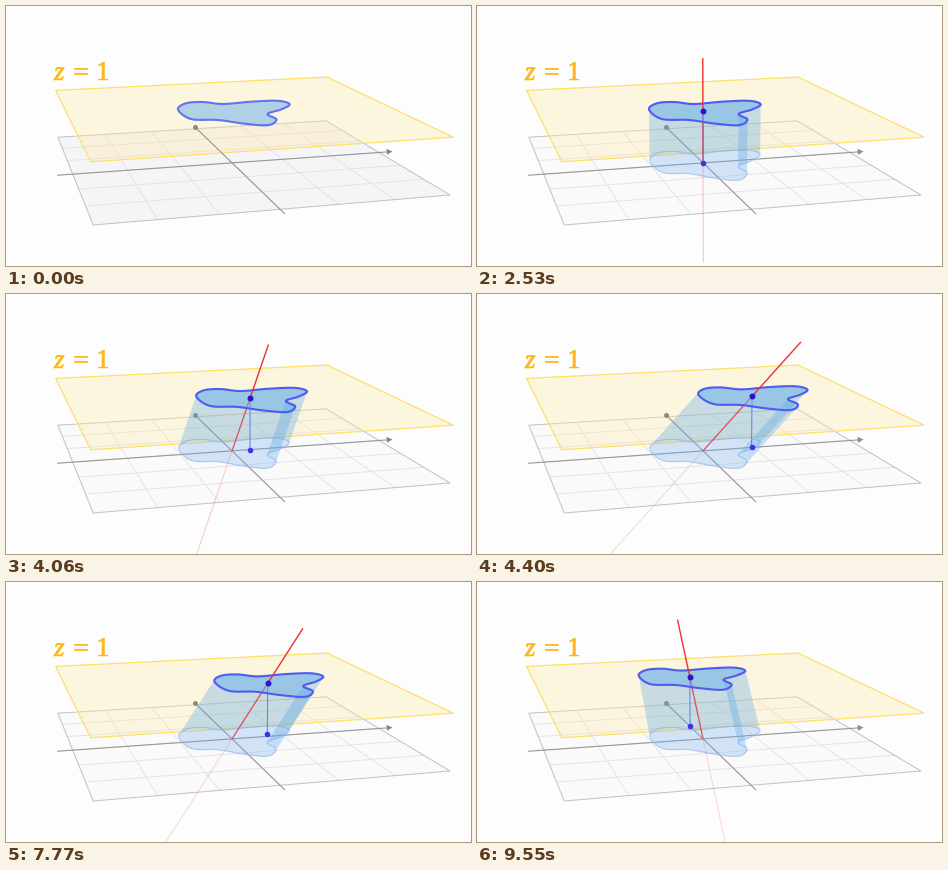
A matplotlib script that plays this animation: 465 px wide and 260 px high, repeating every 9.91 s.

```python
import numpy as np
import matplotlib.pyplot as plt
from matplotlib.animation import FuncAnimation
from matplotlib.collections import PolyCollection
from matplotlib.patheffects import withStroke

W, H, DPI = 465, 260, 100
LOOP, FRAMES = 9910, 200
STEP = LOOP / FRAMES
PX = 72 / DPI
AMBER = "#fbb81c"

# plane corners in the world and on the screen
CORNERS = [(-3, 3), (3, 3), (3, -3), (-3, -3)]
GROUND = [(52, 131), (320, 115), (444, 189), (87, 219)]
SHEET = [(49.5, 84.5), (321, 71), (447, 131), (85, 156)]
# key points of the region on the plane z = 1
REGION = [(172, 103.5), (180, 97.3), (197, 96), (217, 98), (245, 95.7),
          (272, 94.8), (283.7, 98.3), (275, 103.5), (261.5, 108),
          (270.5, 113.5), (262, 119.2), (238, 117.6), (212, 114), (185, 113)]


def fit_camera():
    """Least-squares 3 x 4 camera through the corners of both planes."""
    world = [(x, y, z) for z in (0, 1) for x, y in CORNERS]
    rows, rhs = [], []
    for (x, y, z), (u, v) in zip(world, GROUND + SHEET):
        rows.append([x, y, z, 1, 0, 0, 0, 0, -u * x, -u * y, -u * z])
        rows.append([0, 0, 0, 0, x, y, z, 1, -v * x, -v * y, -v * z])
        rhs += [u, v]
    sol = np.linalg.lstsq(np.array(rows, float), np.array(rhs), rcond=None)[0]
    return np.append(sol, 1).reshape(3, 4)


CAM = fit_camera()


def project(pts):
    pts = np.atleast_2d(np.asarray(pts, float))
    q = np.c_[pts, np.ones(len(pts))] @ CAM.T
    return q[:, :2] / q[:, 2:]


def unproject_top(pts):
    """Screen points to world (x, y) on the plane z = 1."""
    hom = np.c_[CAM[:, 0], CAM[:, 1], CAM[:, 2] + CAM[:, 3]]
    q = np.c_[pts, np.ones(len(pts))] @ np.linalg.inv(hom).T
    return q[:, :2] / q[:, 2:]


def smooth_loop(pts, n=10):
    """Closed Catmull-Rom curve."""
    p = np.asarray(pts, float)
    a, c, d = (np.roll(p, s, axis=0) for s in (1, -1, -2))
    out = [p + 0.5 * s * (c - a + s * (2 * a - 5 * p + 4 * c - d
                                       + s * (3 * (p - c) + d - a)))
           for s in np.arange(n) / n]
    return np.stack(out, axis=1).reshape(-1, 2)


SHAPE = unproject_top(smooth_loop(REGION))


def outline(z, a=0, b=0):
    return project(np.c_[SHAPE + (a, b), np.full(len(SHAPE), z)])


def walls(lower, upper):
    """Side of the solid, one polygon per run of strips facing the same way."""
    along = np.roll(lower, -1, 0) - lower
    rise = upper - lower
    front = along[:, 0] * rise[:, 1] - along[:, 1] * rise[:, 0] > 0
    cuts = np.flatnonzero(front != np.roll(front, 1))
    polys = []
    for i, j in zip(cuts, np.append(cuts[1:], cuts[0] + len(front))):
        run = np.arange(i, j + 1) % len(front)
        polys.append(np.r_[lower[run], upper[run[::-1]]])
    return polys


def ramp(t, mid, rate):
    return 1 / (1 + np.exp(-np.clip((t - mid) * rate, -50, 50)))


fig = plt.figure(figsize=(W / DPI, H / DPI), dpi=DPI, facecolor="#fdfdfd")
ax = fig.add_axes([0, 0, 1, 1])
ax.set_xlim(0, W)
ax.set_ylim(H, 0)
ax.axis("off")
layer = iter(range(1, 100))


def line(color, width, *pts):
    xy = project(pts) if pts else np.zeros((2, 2))
    return ax.plot(xy[:, 0], xy[:, 1], color=color, lw=width * PX,
                   solid_capstyle="butt", zorder=next(layer))[0]


def area(xy, face="none", edge="none", width=0.0, alpha=None):
    return ax.fill(xy[:, 0], xy[:, 1], fc=face, ec=edge, lw=width * PX,
                   alpha=alpha, joinstyle="round", zorder=next(layer))[0]


def dot(color, size, pos=(0, 0, 0)):
    return ax.plot(*project(pos).T, "o", color=color, ms=size * PX, mew=0,
                   zorder=next(layer))[0]


# ground plane with its grid, then the plane z = 1
ground, sheet = (project([(x, y, z) for x, y in CORNERS]) for z in (0, 1))
floor = area(ground, "#f5f4f7")
for k in range(-2, 3):
    line("#e0dfe2", 0.8, (k, -3, 0), (k, 3, 0))
    line("#e0dfe2", 0.8, (-3, k, 0), (3, k, 0))
area(ground, edge="#c2c2c2", width=1)
area(sheet, "#ffe9a8", alpha=0.35)
area(sheet, edge="#ffe06c", width=1.3)

# axes
line("#969696", 1.1, (-3.28, 0, 0), (3.2, 0, 0))
line("#969696", 1.1, (0, -3.26, 0), (0, 3.15, 0))
area(project((3.29, 0, 0)) + [(0, 0), (-6, -2.7), (-5.6, 3.3)], "#8a8a8a")
dot("#8c8a80", 5, (0, 3.15, 0))

# the solid and its axis
base = area(outline(0), "#a9c0ff")
rim = area(outline(0), edge="#9cb8f4", width=1.2)
sides = PolyCollection([], facecolors="#5aa8ea", edgecolors="none",
                       zorder=next(layer))
ax.add_collection(sides)
below = line("#f0504c", 1)
drop = line("#5670ea", 1.1)
inside = line("#e2303a", 1.3)
top = area(outline(1), "#5ba8ec")
edge = area(outline(1), width=2.1)
above = line("#e83430", 1.4)
low_dot = dot("#3a32ee", 5.6)
top_dot = dot("#2616c8", 6)

for x, s, style in ((48, "z", "italic"), (67, "=", "normal"),
                    (90, "1", "normal")):
    ax.text(x, 74, s, family="Liberation Serif", style=style, size=27 * PX,
            color=AMBER, va="baseline", zorder=99,
            path_effects=[withStroke(linewidth=0.6 * PX, foreground=AMBER)])


def span(art, *pts):
    art.set_data(*project(pts).T)


def update(i):
    t = (i + 0.5) * STEP
    shown = np.clip((t - 560) / 310, 0, 1)
    shown = shown * shown * (3 - 2 * shown)

    # shear along x, then swing over to a shear along y
    p1 = ramp(t, 4092, 0.0112)
    p2 = ramp(t, 7820, 0.0168)
    a, b = p1 - p2, p2 ** 1.3
    foot, centre, end = (a, b, 0), (a, b, 1), (2 * a, 2 * b, 2)

    upper = outline(1, a, b)
    sides.set_verts(walls(outline(0), upper))
    top.set_xy(upper)
    edge.set_xy(upper)
    span(below, (0, 0, 0), (-2 * a, -2 * b, -2))
    span(inside, (0, 0, 0), centre)
    span(above, centre, end)
    span(drop, foot, centre)
    span(low_dot, foot)
    span(top_dot, centre)

    for art, alpha in ((base, 0.14), (rim, 0.7), (sides, 0.18),
                       (below, 0.34 - 0.12 * p1), (inside, 0.8), (above, 1),
                       (drop, 0.8), (low_dot, 1), (top_dot, 1)):
        art.set_alpha(alpha * shown)
    top.set_alpha(0.47 + 0.05 * shown)
    edge.set_edgecolor((0.385 - 0.08 * shown, 0.45 - 0.09 * shown, 0.94))
    floor.set_facecolor((0.961 + 0.02 * shown, 0.957 + 0.023 * shown,
                         0.969 + 0.014 * shown))
    return []


anim = FuncAnimation(fig, update, frames=FRAMES, interval=STEP, repeat=True,
                     repeat_delay=0, blit=False)
plt.show()
```
